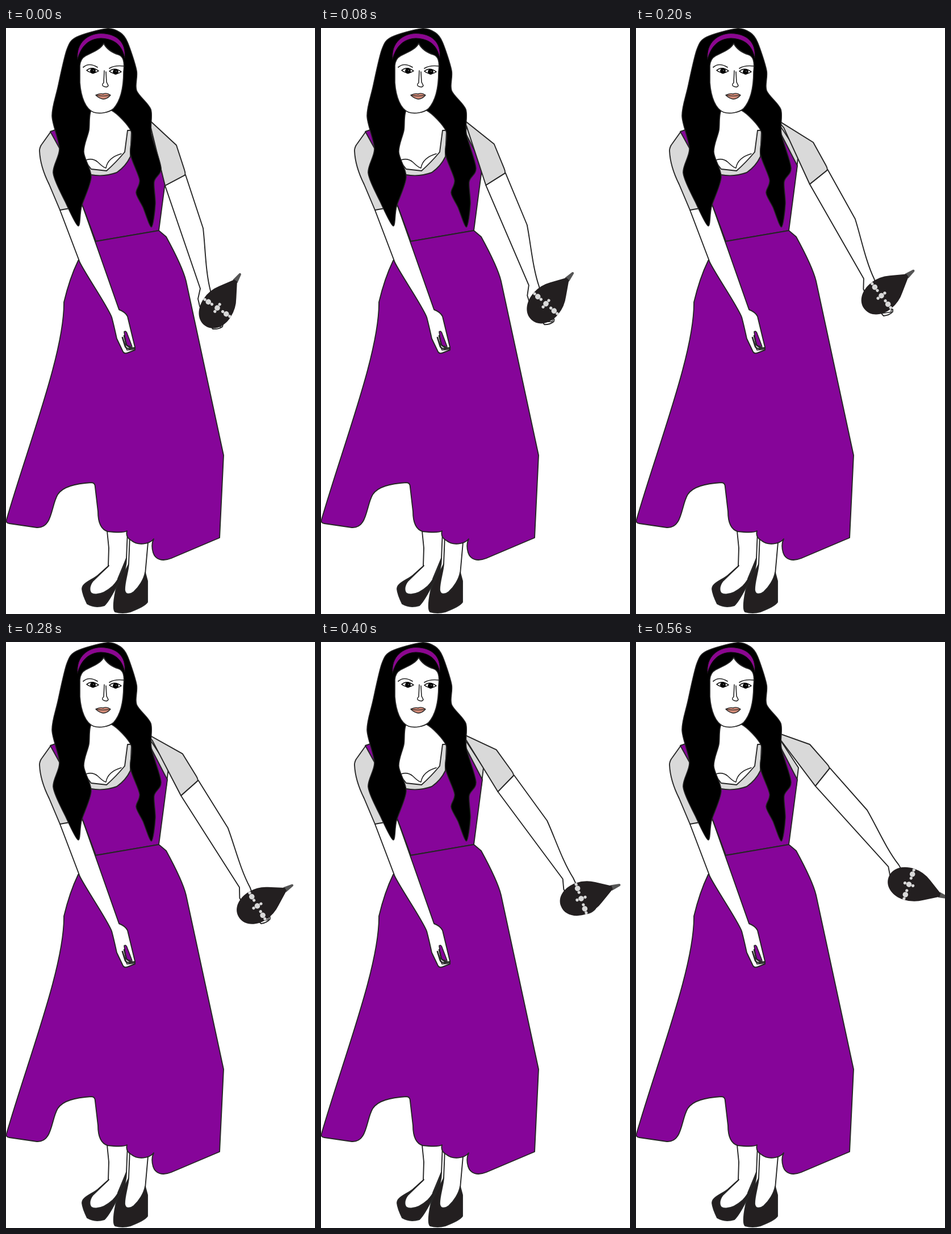
Animation, 544 px wide and 1030 px high, one loop 600 ms. Source, as an HTML page with a canvas:

```html
<!DOCTYPE html>
<html lang="en">
<head>
<meta charset="utf-8">
<title>Swinging arm</title>
<style>
html, body { margin: 0; width: 100%; height: 100%; overflow: hidden; background: #fff; }
canvas { display: block; }
</style>
</head>
<body>
<canvas id="stage" width="544" height="1030"></canvas>
<script>
const ctx = document.getElementById('stage').getContext('2d');
const INK = '#262626', PURPLE = '#860599', GREY = '#d9d9d9', DARK = '#231f20', WHITE = '#fff';
const LOOP = 600, STEP = 40;

const ramp = (t, from, to) => Math.min(1, Math.max(0, (t - from) / (to - from)));
const bulge = k => Math.sin(Math.PI * k);

function shape(d, fill, stroke = INK, width = 1.9) {
  const p = typeof d === 'string' ? new Path2D(d) : d;
  if (fill) { ctx.fillStyle = fill; ctx.fill(p); }
  if (stroke) { ctx.strokeStyle = stroke; ctx.lineWidth = width; ctx.stroke(p); }
}

function line(d, width) { shape(d, null, INK, width); }

function dot(x, y, r, fill) {
  ctx.fillStyle = fill;
  ctx.beginPath();
  ctx.arc(x, y, r, 0, Math.PI * 2);
  ctx.fill();
}

// Draw in a frame moved to x, y and turned by deg
function placed(x, y, deg, paint) {
  ctx.save();
  ctx.translate(x, y);
  ctx.rotate(deg * Math.PI / 180);
  paint();
  ctx.restore();
}

// Closed smooth curve through "x,y" points
function smooth(text) {
  const pts = text.split(' ').map(s => s.split(',').map(Number));
  const at = i => pts[(i + pts.length) % pts.length];
  const p = new Path2D();
  p.moveTo(...pts[0]);
  pts.forEach((b, i) => {
    const a = at(i - 1), c = at(i + 1), d = at(i + 2);
    p.bezierCurveTo(b[0] + (c[0] - a[0]) / 7, b[1] + (c[1] - a[1]) / 7,
      c[0] - (d[0] - b[0]) / 7, c[1] - (d[1] - b[1]) / 7, ...c);
  });
  p.closePath();
  return p;
}

const leftHair = '177,1 124,16 107,38 91,105 81,155 94,212 83,255 104,305 127,348 133,314 150,262 137,218 146,180 151,144';
const rightHair = '186,145 220,181 219,222 235,267 229,290 241,315 256,350 263,310 261,270 273,246 256,186 255,143 230,110 230,75 214,25 201,8';
const hair = smooth(leftHair + ' ' + rightHair);

function legs() {
  line('M178 884 L181 914 L180 946 L160 964 M214 885 L212 932 L197 968 M218 892 L216 942 M250 904 L245 960');
  shape('M181 945 L162 962 C150 971 134 976 134 986 Q135 996 143 1012 Q156 1020 173 1015 C184 1005 192 984 202 968 Q212 953 212 932 C207 950 199 970 188 981 C177 991 166 997 154 995 C145 993 146 981 153 972Z', DARK);
  shape('M216 942 C211 955 196 974 193 990 C190 1005 188 1022 192 1026 Q205 1030 219 1026 Q245 1016 249 1009 L249 972 L245 957 C243 969 234 983 225 991 C219 996 210 997 209 988 C208 976 215 957 216 942Z', DARK);
}

function dress() {
  shape('M250 166 L286 221 L282 255 L250 250Z', GREY);
  shape('M214 180 L209 218 Q193 237 177 251 L150 248 L136 230 L136 262 L222 262 L226 180Z', GREY);
  shape('M130 300 L150 258 Q173 262 195 254 Q211 243 219 226 L221 180 L252 180 L284 242 L269 356 L158 375Z', PURPLE);
  shape('M127 409 L158 375 L269 356 L282 367 Q311 420 317 445 L383 751 L376 896 L291 932 C276 938 263 935 259 922 Q255 908 260 898 C252 908 232 910 221 901 Q210 895 213 884 Q206 888 179 885 C166 881 162 868 162 850 L157 807 Q157 799 150 799 C122 801 100 806 91 820 C79 840 82 880 54 878 L6 871 Q-1 870 1 864 C40 730 103 570 102 482 Q112 440 127 409Z', PURPLE);
}

function restingArm() {
  shape('M135 313 L199 495 Q210 499 214 507 L227 561 L227 566 L214 571 Q208 573 206 569 L195 546 Q190 523 186 508 C177 486 142 436 130 412 L95 320 L110 300 L130 295Z', WHITE);
  line('M158 375 L135 313');
  shape('M208 534 Q212 531 214 539 L222 560 Q215 560 211 556Z', PURPLE, INK, 1.6);
  line('M205 544 L210 560 Q213 566 227 562 M208 541 L212 557 Q216 562 226 563', 2.6);
  line('M207 550 L213 566 L227 565', 1.7);
  shape('M79 182 L64 203 Q59 209 59 216 C60 240 68 259 76 275 L95 320 L112 317 L112 200Z', GREY);
  shape('M78 182 L90 178 L100 222Z', PURPLE);
}

function swingingArm() {
  ctx.translate(-300, -206);
  shape('M316 258 L347 352 C351 385 351 428 360 462 L366 510 L382 521 L381 525 Q374 530 364 529 L341 489 L338 476 L342 458 L280 277Z', WHITE);
  line('M363 524 L378 525 L380 519', 1.5);
  shape('M245 155 L300 206 L314 249 Q317 258 314 259 L280 277 L254 171Z', GREY);
}

function ball() {
  shape('M56 -5 L72 -2 Q75 0 72 2 L56 5Z', '#555', null);
  shape('M-38 0 C-38 -18 -20 -29 0 -29 Q18 -29 33 -19 L58 -3 L58 3 L33 18 Q18 28 0 28.5 C-20 29 -38 18 -38 0Z', DARK, null);
  for (const y of [-19, 0, 19]) {
    dot(0, y, 4.8, GREY);
    for (const s of [-7.5, 7.5]) dot(y ? 0 : s, y ? y + s : 0, 2.6, GREY);
  }
}

function eye(x, y) {
  shape(`M${x - 11} ${y - 1} Q${x - 2} ${y - 9} ${x + 10} ${y} Q${x} ${y + 7} ${x - 11} ${y - 1}Z`, WHITE, '#000', 1.5);
  dot(x, y, 4.9, '#000');
  dot(x + 1, y - 1, 0.9, '#777');
}

function head() {
  line('M141 232 Q153 228 162 236 Q170 244 175 246 M203 221 Q179 228 176 246', 1.6);
  shape(hair, '#000', INK, 1.5);
  shape('M172 27 C167 37 154 42 140 49 Q131 54 130 66 L130 96 C132 122 140 142 154 148 C166 152 182 148 189 142 C202 128 207 103 207 77 C209 60 207 50 198 47 C186 43 177 37 172 27Z', WHITE, INK, 1.7);
  shape('M126 55 C123 25 145 10 167 9.5 C195 10 212 25 209 53 C205 32 193 19 167 18 C143 19 131 35 126 55Z', '#8b068f', '#111', 1);
  line('M136 69 Q146 60 161 69 M182 71 Q191 65 208 67', 1.7);
  eye(153, 75.5);
  eye(193, 77);
  line('M173 75 L172 96 Q167 101 173 103 Q179 105 180 101 L177 95 L176 77', 1.6);
  shape('M158 118 Q166 114 171 116 Q177 113 184 118 Q178 125 171 125 Q164 124 158 118Z', '#d28b78', INK, 1.4);
  line('M159 118 Q171 121 183 118', 1.2);
}

function draw(t) {
  // The arm lifts, then rises more slowly; the ball turns faster at the end
  const lift = ramp(t, 0, 200), rise = ramp(t, 200, 560);
  const drift = ramp(t, 200, 400), twist = ramp(t, 400, 560);
  ctx.fillStyle = WHITE;
  ctx.fillRect(0, 0, 544, 1030);
  ctx.lineJoin = ctx.lineCap = 'round';
  legs();
  dress();
  restingArm();
  placed(300 + 12 * lift - 6 * rise, 206 - 5 * lift - 21 * rise,
    -10.9 * lift - 12.4 * rise, swingingArm);
  head();
  placed(372 + 60 * lift + 26 * drift + 22.5 * twist,
    492 - 21.5 * lift - 19.5 * drift - 25 * twist + 1.3 * (bulge(lift) + bulge(drift)),
    -56 + 36.4 * ramp(t, 0, 400) + 38.6 * twist, ball);
}

const start = performance.now();
function tick() {
  const t = (performance.now() - start) % LOOP;
  draw(Math.floor(t / STEP) * STEP);
  requestAnimationFrame(tick);
}
tick();
</script>
</body>
</html>
```
